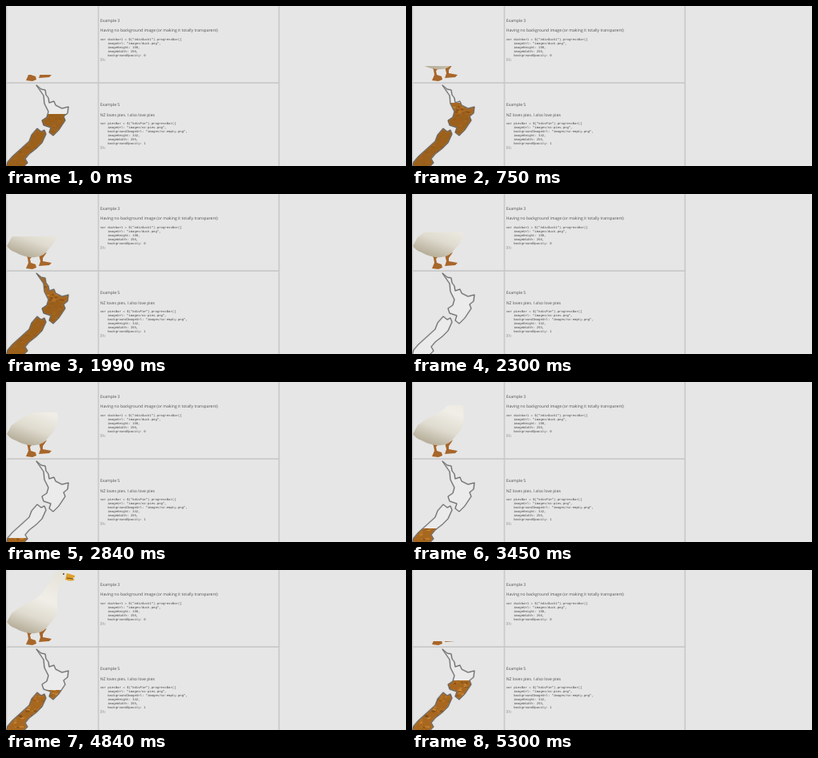
These frames come from a looping animation (500 by 200 pixels, 5.38 s). An HTML page:

```html
<!DOCTYPE html>
<html lang="en">
<head>
<meta charset="utf-8">
<title>Progress bar examples</title>
<style>
  html, body { margin: 0; width: 100%; height: 100%; overflow: hidden; background: #e6e6e6; }
  svg { display: block; width: 500px; height: 200px; }
  text { text-rendering: geometricPrecision; white-space: pre; }
  .prose { font: 5.1px "Open Sans", sans-serif; fill: #505050; }
  .code { font: 3.96px "Liberation Mono", monospace; fill: #444; }
  .shore { fill: none; stroke-linejoin: round; }
</style>
</head>
<body>
<svg viewBox="0 0 500 200">
  <defs>
    <linearGradient id="plumage" x1=".75" y1="0" x2=".4" y2="1">
      <stop offset="0" stop-color="#e6e3da"/>
      <stop offset=".45" stop-color="#f0eee7"/>
      <stop offset=".75" stop-color="#dfdbcf"/>
      <stop offset="1" stop-color="#b8b09c"/>
    </linearGradient>
    <path id="coast" d="M38 99 L44 104 L49 105 L50 111 L53 115 L54 121 L60 119 L62 124
      L70 128 L78 126 L77 134 L72 138 L74 143 L66 155 L59 162 L54 158 L56 152 L47 149
      L45 143 L51 139 L53 132 L48 122 L47 112 Z
      M39 153 L44 157 L48 155 L50 160 L45 171 L38 178 L29 185 L24 191 L27 196 L20 203
      L0 203 L2 195 L8 188 L18 179 L29 169 L32 161 Z"/>
    <clipPath id="coastClip"><use href="#coast"/></clipPath>
    <clipPath id="duckLevel"><rect id="duckWindow" width="114" height="110"/></clipPath>
    <clipPath id="landLevel"><rect id="landWindow" width="114" height="110"/></clipPath>
  </defs>

  <path d="M.5 0V200M115.5 0V200M341.3 0V200M0 96.2H342" stroke="#c9c9c9" stroke-width="1.7"/>

  <g clip-path="url(#duckLevel)">
    <g fill="#a8662a">
      <path d="M24 74 L35 76 L30 81 L31 86 L37 88 L38 92 L33 94 L25 93 L28 86 L27 80 Z"/>
      <path d="M41 76 L51 73 L46 80 L46 84 L57 86 L54 89 L41 90 L43 84 Z"/>
    </g>
    <path fill="url(#plumage)" d="M1 65 L7 54 Q17 46 28 41 Q42 35 50 22 Q55 15 59 7
      Q62 1 69 1 Q75 1 77 6 Q76 13 70 15 Q64 22 64 32 L64.5 48
      Q63 60 54 68 Q47 79 36 79 Q24 80 12 73 Q4 70 1 65 Z"/>
    <path fill="#dfa12c" d="M76 4 Q80 5 86 7 Q87 10 82 10 L86 12 Q82 15 74 12 Z"/>
    <path d="M76 10 L84 11" stroke="#6b4a1c"/>
    <circle cx="72" cy="5" r=".9" fill="#333"/>
  </g>

  <use href="#coast" fill="#ebebeb"/>
  <g clip-path="url(#landLevel)">
    <g clip-path="url(#coastClip)">
      <rect y="97" width="90" height="103" fill="#a8671f"/>
      <g id="crust"></g>
      <rect id="smoothCrust" y="135" width="90" height="65" fill="#995e1b"/>
    </g>
  </g>
  <use href="#coast" class="shore" stroke="#888" stroke-width="2" opacity=".45"/>
  <use href="#coast" class="shore" stroke="#555" stroke-width=".8"/>

  <g id="copy"></g>
</svg>
<script>
const LOOP = 5380;
const TICKS = 70;
// [tick, y] key points of each fill line
const DUCK_LINE = [[0, 86], [18, 64], [37, 38], [53, 20], [63, 1], [64, 96], [70, 87]];
const LAND_LINE = [[0, 135], [26, 95], [27, 204], [37, 195], [53, 170], [70, 136]];
const byId = id => document.getElementById(id);

function add(parent, tag, attributes, content = "") {
  const node = document.createElementNS("http://www.w3.org/2000/svg", tag);
  for (const name in attributes) node.setAttribute(name, attributes[name]);
  node.textContent = content;
  byId(parent).append(node);
}

function example(top, title, caption, code) {
  const x = 117.7;
  add("copy", "text", { class: "prose", x, y: top }, title);
  add("copy", "text", { class: "prose", x, y: top + 12.4 }, caption);
  code.forEach((line, i) =>
    add("copy", "text", { class: "code", x, y: top + 22.9 + i * 5.06 }, line));
}

example(19.8, "Example 3", "Having no background image (or making it totally transparent)", [
  'var duckbar1 = $("#divDuck1").progressBar({',
  '    imageUrl: "images/duck.png",',
  "    imageHeight: 190,",
  "    imageWidth: 256,",
  "    backgroundOpacity: 0",
  "});"
]);
example(125.2, "Example 5", "NZ loves pies. I also love pies", [
  'var piesBar = $("#divPie").progressBar({',
  '    imageUrl: "images/nz-pies.png",',
  '    backgroundImageUrl: "images/nz-empty.png",',
  "    imageHeight: 342,",
  "    imageWidth: 255,",
  "    backgroundOpacity: 1",
  "});"
]);

let seed = 7;
const random = () => (seed = seed * 16807 % 2147483647) / 2147483647;
for (let i = 0; i < 420; i++) {
  add("crust", "ellipse", {
    cx: random() * 82, cy: 98 + random() * 102,
    rx: 1 + random() * 1.8, ry: .5 + random() * .8,
    fill: ["#d39440", "#7d4a14", "#bd7827"][i % 3], opacity: .75
  });
}

function yAt(tick, keys) {
  const next = keys.findIndex(([keyTick]) => keyTick > tick);
  const [fromTick, fromY] = keys[next - 1];
  const [toTick, toY] = keys[next];
  return fromY + (toY - fromY) * (tick - fromTick) / (toTick - fromTick);
}

function draw(now) {
  const tick = Math.floor(((now + 10) % LOOP) / LOOP * TICKS);
  byId("duckWindow").setAttribute("y", Math.round(yAt(tick, DUCK_LINE)));
  byId("landWindow").setAttribute("y", Math.round(yAt(tick, LAND_LINE)));
  // the crust starts the loop smooth and turns grainy once it refills
  byId("smoothCrust").setAttribute("opacity", tick < 27 ? .8 : 0);
  requestAnimationFrame(draw);
}
draw(0);
</script>
</body>
</html>
```
